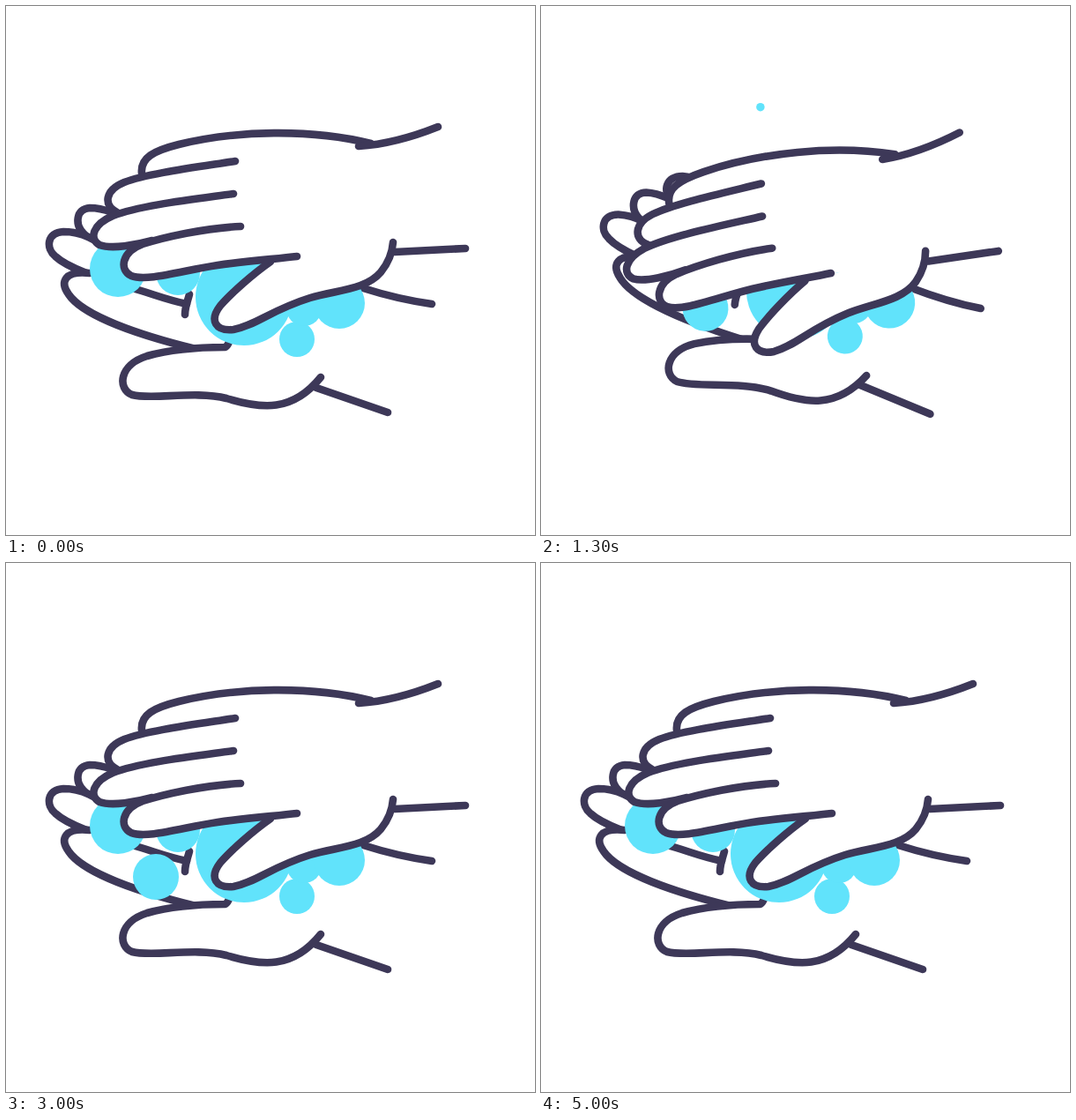
An HTML page that plays this animation: 600x600 px, repeating every 5.1 s.

```html
<!DOCTYPE html>
<html lang="en">
<head>
<meta charset="utf-8">
<title>Washing hands</title>
<style>
  html, body { margin: 0; height: 100%; overflow: hidden; background: #fff; }
  svg { display: block; width: 100vw; height: 100vh; }
  path { fill: #fff; stroke: #3d3858; stroke-width: 8.6; stroke-linecap: round; stroke-linejoin: round; }
  .open { fill: none; }
  .skin { stroke: none; }
  circle { fill: #61e3fb; }
</style>
</head>
<body>
<svg viewBox="0 0 600 600">
  <g id="lowArm">
    <path class="open" d="M405 320C430 328 455 334 483 338"/>
    <path class="open" d="M352 433L433 461"/>
  </g>
  <g id="lowHand">
    <path d="M183 226C165 215 150 208 135 208C116 209 113 227 124 235C132 242 138 246 146 250"/>
    <path d="M143 247C130 236 110 229 95 229C79 230 78 248 88 258C94 264 100 268 108 274"/>
    <path d="M116 279C105 265 85 256 65 256C46 257 45 275 56 284C70 297 100 307 150 322C170 328 185 334 205 338"/>
    <path d="M95 303C66 300 61 313 71 327C87 351 150 373 215 389"/>
    <path class="open" d="M208 327C206 335 203 341 203 350"/>
    <path d="M254 377Q252 386 248 387C215 387 185 390 160 397C128 407 126 434 143 441C165 447 215 436 250 445C290 457 325 461 357 421"/>
    <g id="foam"></g>
  </g>
  <g id="drops"></g>
  <g id="topHand">
    <path class="skin" d="M154 190L414 156L439 268L300 290L166 266L126 234Z"/>
    <path d="M154 190C152 172 168 164 196 157C262 141 345 139 414 156"/>
    <path d="M260 176C215 183 160 190 134 200C112 209 110 226 126 234"/>
    <path d="M258 213C215 219 152 226 121 238C98 248 94 264 106 271C120 276 148 271 166 266"/>
    <path d="M300 290C280 304 255 326 243 340C230 357 238 369 258 367C284 362 300 345 345 331C375 322 408 322 425 302C434 291 438 281 439 268"/>
    <path d="M266 250C225 252 180 262 155 270C131 279 128 299 142 306C160 313 200 300 240 294C275 289 305 287 330 284"/>
  </g>
  <g id="topArm">
    <path class="open" d="M400 159C432 157 460 149 490 137"/>
    <path class="open" d="M441 279L521 275"/>
  </g>
</svg>
<script>
const LOOP = 5100, STEP = 100, RUB = 1000, PUFF = 400;
const $ = id => document.getElementById(id);

// Foam on the lower hand: x, y, radius, time it swells, time it is gone
const foam = [
  [127, 298, 32], [195, 303, 25], [270, 330, 55],
  [330, 378, 20], [338, 343, 20], [378, 337, 29],
  [170, 356, 26, 300, 4800],
  [117, 317, 33, 300, 1400],
  [223, 365, 31, 1300, 2300],
  [283, 359, 38, 1300, 3000]
];

// Loose bubbles: birth, life, start x, y, drift x, y, radius
const drops = [
  [400, 1000, 238, 187, 11, -73, 25],
  [1400, 1000, 152, 222, -11, -73, 15.5],
  [1500, 1400, 230, 377, -12, 67, 7],
  [2000, 1000, 267, 170, 11, -33, 19],
  [3000, 1000, 354, 166, 7, -30, 20],
  [3490, 830, 447, 302, 7, 101, 20],
  [4100, 700, 158, 357, -14, 50, 6.5]
];

function addCircles(parent, list) {
  return list.map(() => parent.appendChild(
    document.createElementNS('http://www.w3.org/2000/svg', 'circle')));
}
const foamDots = addCircles($('foam'), foam);
const dropDots = addCircles($('drops'), drops);

const clamp = v => Math.max(0, Math.min(1, v));

function place(dot, x, y, r) {
  dot.setAttribute('cx', x);
  dot.setAttribute('cy', y);
  dot.setAttribute('r', r);
}

// Turn a part about its pivot and shift it
function pose(id, px, py, angle, dx, dy) {
  $(id).setAttribute('transform',
    `translate(${dx} ${dy}) rotate(${angle} ${px} ${py})`);
}

function drawHands(t) {
  // Cosine swing that is zero at the start of every rub
  const turn = 2 * Math.PI;
  const wave = (size, lag) =>
    size / 2 * (Math.cos(turn * lag) - Math.cos(turn * (t / RUB - lag)));
  pose('topHand', 260, 176, wave(-10.4, 0.05), wave(-13.2, -0.05), wave(46, 0.03));
  pose('topArm', 521, 275, wave(-7.5, -0.03), wave(-3, -0.03), wave(4, -0.03));
  pose('lowHand', 357, 421, wave(9, 0.07), wave(15, -0.1), wave(-4.8, 0.07));
  pose('lowArm', 433, 461, wave(4.7, -0.03), wave(11.5, -0.03), wave(2.5, -0.03));
}

function drawFoam(t) {
  foam.forEach(([x, y, r, born = -PUFF, gone = LOOP + PUFF], i) =>
    place(foamDots[i], x, y, r * clamp(Math.min(t - born, gone - t) / PUFF)));
}

// Bubbles pop out, slow down and shrink away
function drawDrops(t) {
  drops.forEach(([born, life, x, y, dx, dy, r], i) => {
    const u = clamp((t - born) / life);
    const ease = 1 - (1 - u) ** 2;
    place(dropDots[i], x + dx * ease, y + dy * ease, r * clamp(u * 8) * (1 - u * u));
  });
}

function draw(time) {
  const t = Math.floor(time % LOOP / STEP) * STEP;
  drawHands(t);
  drawFoam(t);
  drawDrops(t);
}

const start = performance.now();
function tick() {
  draw(performance.now() - start);
  requestAnimationFrame(tick);
}
tick();
</script>
</body>
</html>
```
